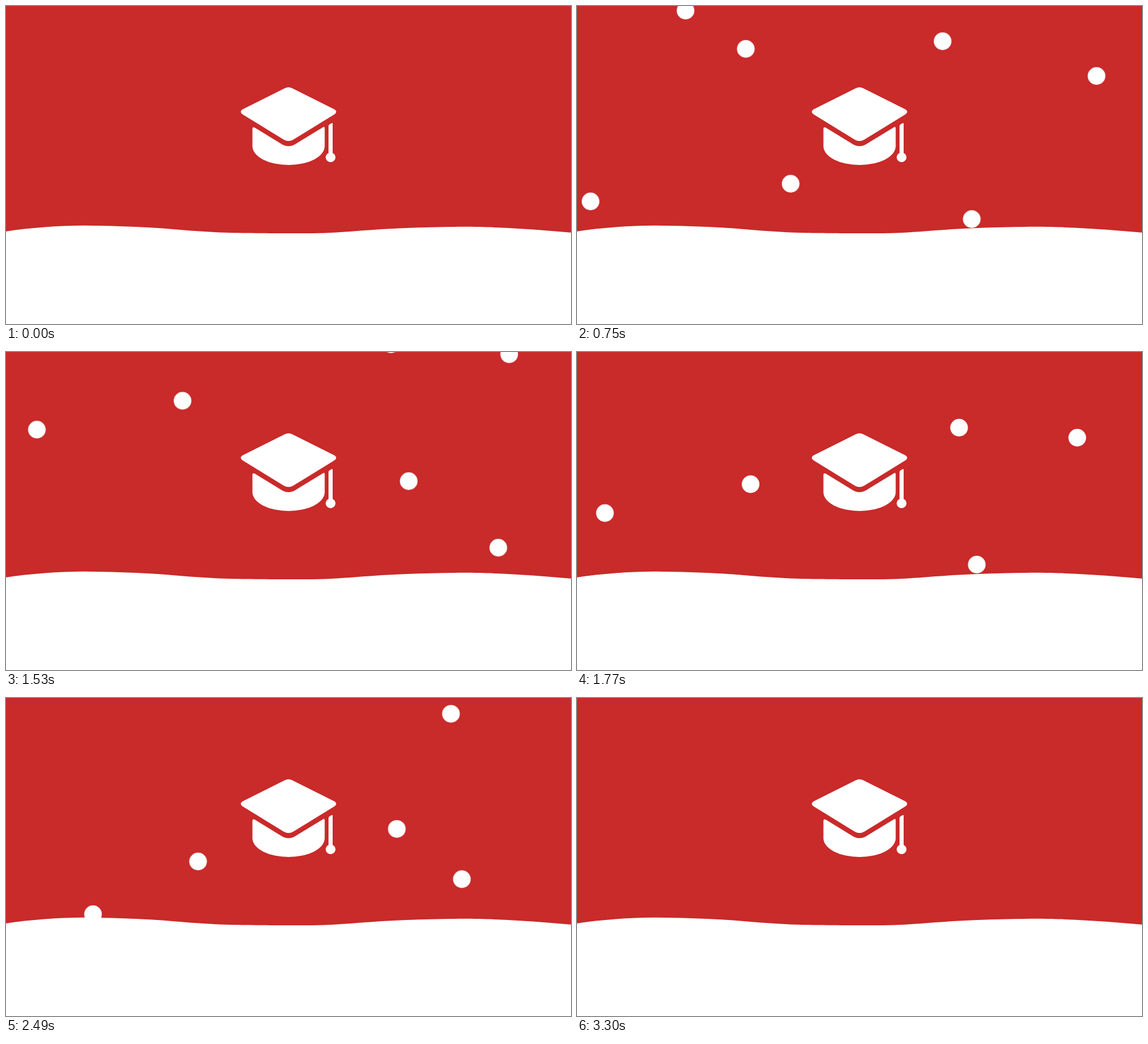
An HTML page for the animation above (3600 ms loop, 960 by 540 pixels).

```html
<!DOCTYPE html>
<html lang="en">
<head>
<meta charset="utf-8">
<title>Snowfall</title>
<style>
  html, body { margin: 0; width: 100%; height: 100%; overflow: hidden; background: #c92a2a; }
  svg { display: block; width: 960px; height: 540px; fill: #fff; }

  /* All flakes share one velocity, so they fall as a single sheet. */
  .snow {
    fill: none;
    stroke: #fff;
    stroke-width: 30px;
    stroke-linecap: round;
    animation: fall 3600ms steps(120, end) infinite;
  }
  @keyframes fall {
    from { transform: translate(0, 0); }
    to { transform: translate(-75.6px, 2125.4px); }
  }
</style>
</head>
<body>
<svg viewBox="0 0 960 540">
  <rect width="960" height="540" fill="#c92a2a"/>

  <!-- Each zero-length stroke is one round flake. -->
  <path class="snow" d="
    M686.5 -81h0 M38.8 -111h0 M378.8 -141h0 M898.5 -324h0 M302.6 -370h0
    M637 -383h0 M200.2 -435h0 M868.6 -571h0 M716.4 -684h0 M84.6 -771.5h0
    M332.1 -820.5h0 M887.1 -899.5h0 M686.3 -916.5h0 M200.1 -1103h0
    M826.8 -1162.5h0 M378.6 -1192.5h0 M716.3 -1247.8h0 M808.3 -1443.3h0
    M99.9 -1544h0"/>

  <!-- Snowy ground -->
  <path d="M0 382.7 C40 376.6 90 373 133 372.8 C175 373 210 374.5 250 376.6
    C290 379 330 384 380 385 C420 385.9 480 386.2 520 386.1
    C580 384.8 620 379 680 377 C730 374.8 790 374 830 376
    C880 378.2 920 381 960 384.8 V540 H0Z"/>

  <!-- Graduation cap: board, crown, tassel -->
  <path d="M474 139.5 Q480 136.5 486 139.5 L558 175.5 Q564 179.5 558 184
    L488 227 Q480 231.5 472 227 L402 184 Q396 179.5 402 175.5Z"/>
  <path d="M418.7 238 V209 Q418.7 204 423.5 207 L470 235.5 Q480 240.5 490 235.5
    L538 206.2 Q541.5 203.7 541.5 208.5 V238 A61.4 32 0 0 1 418.7 238Z"/>
  <path d="M548 252 V204 Q548 202 549.8 201 L553 199 Q555 198 555 200 V252Z"/>
  <circle cx="551.5" cy="257" r="8.3"/>
</svg>
</body>
</html>
```
